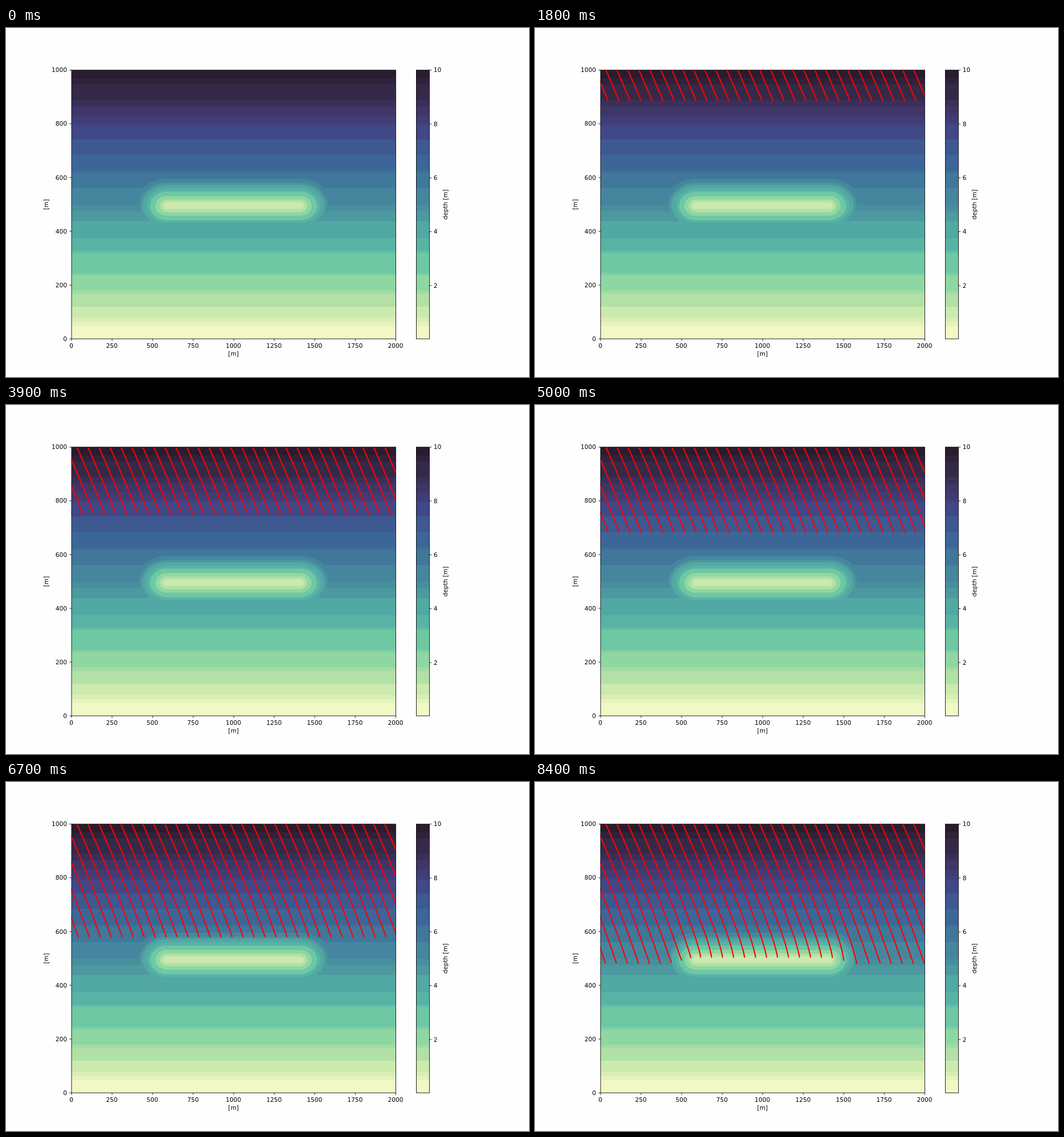
These frames come from a looping animation (917x611 px, 8500 ms). An HTML page with a canvas:

```html
<!DOCTYPE html>
<html>
<head>
<meta charset="utf-8">
<style>
html, body { margin: 0; width: 100%; height: 100%; overflow: hidden; background: #fefefe; }
canvas { display: block; }
</style>
</head>
<body>
<canvas id="stage" width="917" height="611"></canvas>
<script>
const W = 917, H = 611;
const ctx = document.getElementById('stage').getContext('2d');
const plot = { left: 114.6, top: 73.3, width: 568.5, height: 470.5 };
const bottom = plot.top + plot.height;
const snap = 0.38; // frames and ticks sit slightly right of and below the data
const toX = m => plot.left + m * plot.width / 2000;
const toY = m => bottom - m * plot.height / 1000;

// Top pixel row and colour of each depth band, deepest first.
const bands = [
  [74, '#291c2f'], [88, '#2f223a'], [99, '#352948'], [126, '#3a2f58'],
  [137, '#3f3667'], [153, '#413c74'], [166, '#41417e'], [171, '#414887'],
  [195, '#3e5892'], [222, '#3d6698'], [250, '#3f6f99'], [253, '#40779a'],
  [280, '#45869e'], [310, '#488f9e'], [321, '#4c999f'], [338, '#52a8a3'],
  [368, '#58b3a5'], [390, '#62bea5'], [394, '#6dc8a3'], [429, '#80cea2'],
  [433, '#8fd7a2'], [460, '#a4dba3'], [466, '#b1e1a7'], [488, '#cceaae'],
  [507, '#d8eeb4'], [515, '#e5f3bb'], [522, '#f1f8c5']
];

// Sloping seabed with an elongated shoal.
function depth(x, y) {
  const slope = Math.max(0.1, y / 100);
  const dist = Math.hypot(Math.max(0, Math.abs(x - 1000) - 408) / 2, y - 494);
  return Math.min(slope, Math.max(0.9, 0.55 + 0.05 * dist));
}

function depthColor(h) {
  const row = toY(h * 100);
  let color = bands[0][1];
  for (const [top, c] of bands) if (row >= top) color = c;
  return color;
}

// Phase speed from the linear dispersion relation.
function speed(x, y) {
  const g = 9.81, omega = 2 * Math.PI / 6.5;
  const k0h = omega * omega / g * depth(x, y);
  let t = Math.sqrt(Math.tanh(k0h));
  for (let i = 0; i < 4; i++) t = (t + Math.tanh(k0h / t)) / 2;
  return g / omega * t;
}

// One point per second along a refracting ray.
function traceRay(x, seconds) {
  const angle = 36.1 * Math.PI / 180, bend = 0.73, sub = 4, eps = 4;
  let y = 1000, nx = Math.sin(angle), ny = -Math.cos(angle);
  const points = [[toX(x), toY(y)]];
  for (let i = 1; i <= seconds * sub; i++) {
    const c = speed(x, y);
    const gx = (speed(x + eps, y) - speed(x - eps, y)) / (2 * eps);
    const gy = (speed(x, y + eps) - speed(x, y - eps)) / (2 * eps);
    const along = nx * gx + ny * gy;
    nx -= bend * (gx - nx * along) / sub;
    ny -= bend * (gy - ny * along) / sub;
    const norm = Math.hypot(nx, ny);
    nx /= norm;
    ny /= norm;
    x += c * nx / sub;
    y += c * ny / sub;
    if (i % sub === 0) points.push([toX(x), toY(y)]);
  }
  return points;
}

function drawBands(g, x, width) {
  bands.forEach(([top, color], i) => {
    const end = i + 1 < bands.length ? bands[i + 1][0] : 544;
    g.fillStyle = color;
    g.fillRect(x, top, width, end - top);
  });
}

function drawLabel(g, text, x, y, align, turned) {
  g.save();
  g.translate(x, y);
  if (turned) g.rotate(-Math.PI / 2);
  g.textAlign = align;
  g.fillText(text, 0, 0);
  g.restore();
}

function drawTick(g, x, y, dx, dy) {
  g.beginPath();
  g.moveTo(x + snap, y + snap);
  g.lineTo(x + snap + dx, y + snap + dy);
  g.stroke();
}

function drawFrame(g, x, width) {
  g.strokeStyle = '#000';
  g.lineWidth = 0.85;
  g.strokeRect(x + snap, plot.top + snap, width, plot.height);
}

function makeChart() {
  const layer = document.createElement('canvas');
  layer.width = W;
  layer.height = H;
  const g = layer.getContext('2d');
  g.fillStyle = '#fefefe';
  g.fillRect(0, 0, W, H);
  drawBands(g, 115, 568);
  drawBands(g, 719, 23);
  for (let py = 255; py < 365; py++) {
    for (let px = 220; px < 580; px++) {
      const x = (px + 0.5 - plot.left) * 2000 / plot.width;
      const y = (bottom - py - 0.5) * 1000 / plot.height;
      const h = depth(x, y);
      if (h >= y / 100) continue;
      g.fillStyle = depthColor(h);
      g.fillRect(px, py, 1, 1);
    }
  }
  drawFrame(g, 719.1, 23);
  g.fillStyle = '#000';
  g.font = '10.6px "DejaVu Sans", sans-serif';
  for (let m = 0; m <= 2000; m += 250) {
    drawTick(g, toX(m), bottom, 0, 3.7);
    drawLabel(g, m, toX(m), 559.5, 'center');
  }
  for (let m = 0; m <= 1000; m += 200) {
    drawTick(g, plot.left, toY(m), -3.7, 0);
    drawLabel(g, m, 107, toY(m) + 4, 'right');
  }
  for (let h = 2; h <= 10; h += 2) {
    const y = 544.8 - 47.15 * h;
    drawTick(g, 742.1, y, 3.7, 0);
    drawLabel(g, h, 749.8, y + 4, 'left');
  }
  drawLabel(g, '[m]', 398.8, 574.2, 'center');
  drawLabel(g, '[m]', 74.2, 309, 'center', true);
  drawLabel(g, 'depth [m]', 774.3, 309, 'center', true);
  return layer;
}

const chart = makeChart();
const rays = Array.from({ length: 40 }, (_, i) => traceRay(2000 - 67.8 * i, 83));

function draw(now) {
  const step = Math.max(0, Math.floor(now % 8500 / 100) - 1);
  ctx.drawImage(chart, 0, 0);
  if (step > 0) {
    ctx.save();
    ctx.beginPath();
    ctx.rect(plot.left, plot.top, plot.width, plot.height);
    ctx.clip();
    ctx.strokeStyle = '#f00';
    ctx.lineWidth = 2.1;
    ctx.lineCap = 'square';
    ctx.lineJoin = 'round';
    ctx.beginPath();
    for (const ray of rays) {
      ctx.moveTo(...ray[0]);
      for (let i = 1; i <= step; i++) ctx.lineTo(...ray[i]);
    }
    ctx.stroke();
    ctx.restore();
  }
  drawFrame(ctx, plot.left, plot.width);
}

const start = performance.now();
function tick() {
  draw(performance.now() - start);
  requestAnimationFrame(tick);
}
tick();
</script>
</body>
</html>
```
